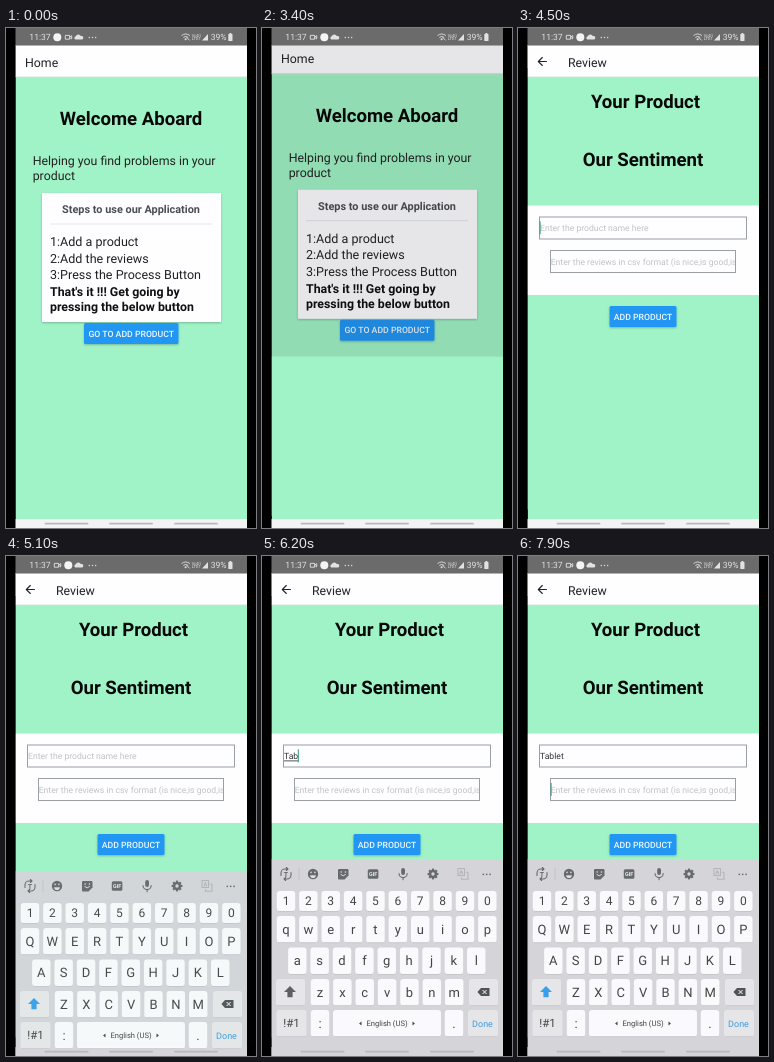
Write an HTML page that moves like this. It is 250 by 500 pixels and loops after 8000 ms.

```html
<!DOCTYPE html>
<html lang="en">
<head>
<meta charset="utf-8">
<title>Product review app</title>
<style>
  html, body { margin: 0; width: 100%; height: 100%; overflow: hidden; background: #000; }
  svg { display: block; width: 100%; height: 100%; }
  text { font-family: Roboto, sans-serif; fill: #222; white-space: pre; text-rendering: geometricPrecision; }
  .mid { text-anchor: middle; }
  .bold { font-weight: 700; fill: #111; }
  .title { font-size: 18.6px; font-weight: 700; text-anchor: middle; fill: #080808; }
  .body { font-size: 12.35px; }
  .input { font-size: 8.65px; fill: #333; }
  .hint { fill: #c2c2c5; }
  .line { fill: none; stroke: #66696d; stroke-width: 1.1; stroke-linecap: round; stroke-linejoin: round; }
</style>
</head>
<body>
<svg id="stage" viewBox="0 0 250 500"></svg>
<script>
const LOOP = 8000, STEP = 100;
const LEFT = 9.5, WIDTH = 231.5, TOP = 17, BOTTOM = 491, HEIGHT = BOTTOM - TOP;
const GREEN = '#a0f3c6', WHITE = '#fefdff', TRAY = '#d5d5d9', PALE = '#e6e6e9';

const rect = (x, y, w, h, fill, extra = '') =>
  `<rect x="${x}" y="${y}" width="${w}" height="${h}" fill="${fill}" ${extra}/>`;
const band = (y, h, fill, extra) => rect(LEFT, y, WIDTH, h, fill, extra);
const text = (x, y, str, cls = '', extra = '') =>
  `<text x="${x}" y="${y}" class="${cls}" ${extra}>${str}</text>`;
const path = (d, extra = 'class="line"') => `<path d="${d}" ${extra}/>`;
const circle = (x, y, r, fill) => `<circle cx="${x}" cy="${y}" r="${r}" fill="${fill}"/>`;

const header = (x, label) =>
  band(TOP, 32, WHITE) + band(48.5, 1, '#d3e2da') + text(x, 38.7, label, 'body');

const button = (x, y, w, label) =>
  rect(x, y, w, 21, '#2196f3', 'rx="1.5" filter="url(#shadow)"') +
  text(x + w / 2, y + 13.6, label, 'mid', 'style="fill:#eef7ff;font-size:8.7px;font-weight:500"');

function homeScreen() {
  const steps = ['1:Add a product', '2:Add the reviews', '3:Press the Process Button'];
  return band(TOP, HEIGHT, GREEN) + header(19, 'Home') +
    text(125, 97, 'Welcome Aboard', 'title') +
    text(26.7, 137.3, 'Helping you find problems in your', 'body') +
    text(26.7, 151.8, 'product', 'body') +
    rect(36, 165, 179, 129, WHITE, 'filter="url(#shadow)"') +
    text(125, 185, 'Steps to use our Application', 'mid bold', 'style="fill:#4a4e53;font-size:10.9px"') +
    rect(44, 195.5, 162, 1, '#e1e8ee') +
    steps.map((s, i) => text(44, 218 + i * 16.7, s, 'body', 'style="font-size:12.55px"')).join('') +
    text(44, 268.2, "That's it !!! Get going by", 'body bold') +
    text(44, 282.8, 'pressing the below button', 'body bold') +
    button(78, 295, 94.5, 'GO TO ADD PRODUCT');
}

const inputBox = (x, y, w) =>
  rect(x, y, w, 22, WHITE, 'stroke="#9a9fa4" stroke-width="1"');

function reviewScreen() {
  return band(TOP, HEIGHT, GREEN) + header(50, 'Review') +
    path('M28.5 33.5H20.5M24.3 29.5l-4 4 4 4', 'class="line" style="stroke:#222"') +
    text(127.5, 80, 'Your Product', 'title') +
    text(125, 138.3, 'Our Sentiment', 'title') +
    band(177.5, 89.5, WHITE) +
    inputBox(21.5, 189, 207) + inputBox(32.5, 222.5, 185) +
    text(22, 203, 'Enter the product name here', 'input hint', 'id="hint"') +
    text(22, 203, '', 'input', 'id="typed"') +
    rect(22, 204.5, 0, .8, '#333', 'id="underline"') +
    `<g clip-path="url(#reviews)">` +
    text(32.7, 236.7, 'Enter the reviews in csv format (is nice,is good,is bad)', 'input hint') + '</g>' +
    rect(0, 0, 1, 13, '#2f9a7c', 'id="caret"') +
    button(91.5, 278, 67, 'ADD PRODUCT');
}

function statusBar() {
  const ink = '#e2e2e2';
  const label = (x, y, str, size) => text(x, y, str, '', `style="fill:${ink};font-size:${size}px"`);
  const stroke = `fill="none" stroke="${ink}" stroke-width=".9"`;
  return band(0, 17.5, '#6b6b6b') +
    label(23.3, 12.4, '11:37', 8.6) +
    `<g id="badge">${circle(0, 0, 4, '#f4f4f4')}</g>` +
    `<g id="camera">${path('M-3-1.9h4.3v3.8H-3zM1.5-.4 3.4-1.6v3.2L1.5.4', stroke)}</g>` +
    path('M69.3 11.5a1.7 1.7 0 0 1 .5-3.2 2.7 2.7 0 0 1 5-.2 1.8 1.8 0 0 1 1.4 3.4z', `fill="${ink}"`) +
    [83.3, 86.5, 89.7].map(x => circle(x, 9.5, .7, ink)).join('') +
    path('M175.5 7.6q4.2-3.2 8.4 0M177.3 9.4q2.4-2 4.8 0M180.5 9l3 3.4', stroke) +
    circle(179.6, 11.3, 1, ink) +
    label(185.8, 8.5, 'VoD)', 4.2) + label(185.8, 12.4, 'LTE1', 4.2) +
    path('M196 12.5h6V6z', `fill="${ink}"`) +
    label(204.7, 12.4, '39%', 8.6) +
    rect(222.3, 6, 4.2, 7, ink, 'rx=".6"') + rect(223.4, 5, 2, 1.2, ink);
}

const cap = (cx, y, w, h, fill) =>
  rect(cx - w / 2, y, w, h, fill, 'rx="3"') + rect(cx - w / 2 + 1.5, y + h, w - 3, .6, '#bcbcc1');

const key = (cx, y, w, h, label, { cls = '', size = 13, fill = '#faf9fb' } = {}) =>
  cap(cx, y, w, h, fill) +
  text(cx, y + h / 2 + size * .35, label, 'mid ' + cls, `style="fill:#444;font-size:${size}px"`);

function toolbar() {
  const dark = '#66696d';
  const gear = Array.from({ length: 8 }, (_, i) =>
    rect(169.9, 312.6, 2.2, 3, dark, `transform="rotate(${i * 45} 171 318)"`)).join('');
  return path('M19 319.5v-2.5a4 4 0 0 1 4-4h2.5M29 316.5v2.5a4 4 0 0 1-4 4h-2.5M24.3 311.5l1.7 1.5-1.7 1.5M23.7 321.5l-1.7 1.5 1.7 1.5') +
    text(24, 320.6, 'T', 'mid', `style="fill:${dark};font-size:7px;font-weight:700"`) +
    rect(36.7, 312, .7, 12, '#bcbcc0') +
    circle(51, 318, 5.2, dark) + circle(49.1, 316.4, .8, '#ddd') + circle(52.9, 316.4, .8, '#ddd') +
    path('M48.2 319.2h5.6a2.8 2.8 0 0 1-5.6 0z', 'fill="#ddd"') +
    path('M77 312.9h8.5a1 1 0 0 1 1 1v5.5l-4 4H77a1 1 0 0 1-1-1v-8.5a1 1 0 0 1 1-1z', `fill="${dark}"`) +
    path('M78.6 318.4q2.6 2.8 5.2 0', 'fill="none" stroke="#ddd" stroke-width="1"') +
    circle(79.2, 316, .8, '#ddd') + circle(83.4, 316, .8, '#ddd') +
    rect(105.8, 313.3, 10.6, 9.4, dark, 'rx="1.5"') +
    text(111.1, 320, 'GIF', 'mid', 'style="fill:#eee;font-size:5.4px;font-weight:700"') +
    rect(139.2, 312, 3.8, 7, dark, 'rx="1.9"') + path('M137 317.5a4.1 4.1 0 0 0 8.2 0M141.1 321.8v2') +
    gear + circle(171, 318, 4.1, dark) + circle(171, 318, 1.7, TRAY) +
    '<g opacity=".3">' + path('M196 312.5h6.5v7H196zM199.5 321.5v1.8h6.5v-7h-1.8M198 318l1.3-3.5 1.3 3.5') + '</g>' +
    [221.3, 224.7, 228.1].map(x => circle(x, 318.3, .85, dark)).join('');
}

function keyboard() {
  const row = (chars, x, y, h, style) =>
    [...chars].map((c, i) => key(x + i * 22.37, y, 18.4, h, c, style)).join('');
  const letter = { cls: 'letter' };
  return band(303, 200, TRAY) + toolbar() +
    row('1234567890', 24, 335, 20, { size: 12 }) +
    row('QWERTYUIOP', 24, 360, 26.5, letter) +
    row('ASDFGHJKL', 35.3, 391.5, 26.5, letter) +
    row('ZXCVBNM', 58, 423, 26.5, letter) +
    cap(28.5, 423, 29, 26.5, PALE) +
    path('M28 430l6 6h-3.4v5.2h-5.2V436H22z', 'id="shift" stroke-linejoin="round"') +
    cap(221.5, 423, 29, 26.5, PALE) +
    path('M219 432h8.5v8H219l-3.6-4z', 'fill="#505458"') +
    path('M220.6 434l4 4m0-4-4 4', 'stroke="#fff" stroke-width="1"') +
    key(29.5, 454, 30, 26.5, '!#1', { size: 11.5, fill: PALE }) +
    key(58, 454, 18.4, 26.5, ':') +
    key(125, 454, 108, 26.5, 'English (US)', { size: 7.6 }) +
    path('M99.5 465.5v4l-2.4-2zM150.5 465.5v4l2.4-2z', 'fill="#444"') +
    key(192, 454, 18.4, 26.5, '.') +
    cap(221, 454, 30, 26.5, PALE) +
    text(220.5, 470.5, 'Done', 'mid', 'style="fill:#3f9be0;font-size:9px"');
}

const stage = document.getElementById('stage');
stage.innerHTML = `<defs>
    <filter id="shadow" x="-10%" y="-20%" width="120%" height="150%">
      <feDropShadow dx="0" dy="1" stdDeviation=".9" flood-opacity=".25"/></filter>
    <clipPath id="screen">${band(TOP, HEIGHT, '#000')}</clipPath>
    <clipPath id="phone">${band(0, 500, '#000')}</clipPath>
    <clipPath id="reveal"><rect id="edge" x="${LEFT}" width="${WIDTH}" height="500"/></clipPath>
    <clipPath id="reviews">${rect(32.5, 223, 184.5, 21, '#000')}</clipPath>
  </defs>` +
  rect(0, 0, 250, 500, '#000') +
  `<g clip-path="url(#screen)">
    <g id="home">${homeScreen()}${band(TOP, HEIGHT, '#000', 'id="dim"')}</g>
    <g clip-path="url(#reveal)"><g id="review">${reviewScreen()}</g></g>
  </g>` + statusBar() + band(BOTTOM, 500 - BOTTOM, '#f3f3f3') +
  `<g clip-path="url(#phone)"><g id="keyboard">${keyboard()}</g></g>` +
  [38.5, 103, 168].map(x => rect(x, 494.8, 44, 1.6, '#b9b9b9', 'rx=".8"')).join('');

const el = id => document.getElementById(id);
const set = (id, attrs) => Object.entries(attrs).forEach(([k, v]) => el(id).setAttribute(k, v));
const letters = [...stage.querySelectorAll('.letter')];
const clamp = v => Math.min(1, Math.max(0, v));

// cubic-bezier(.35, .45, 0, 1), solved by bisection
function revealEase(x) {
  const curve = (a, b, s) => 3 * (1 - s) ** 2 * s * a + 3 * (1 - s) * s * s * b + s ** 3;
  let lo = 0, hi = 1;
  for (let i = 0; i < 24; i++) {
    const mid = (lo + hi) / 2;
    if (curve(.35, 0, mid) < x) lo = mid; else hi = mid;
  }
  return curve(.45, 1, lo);
}

const TYPING = [[0, ''], [5600, 'T'], [6000, 'Ta'], [6200, 'Tab'], [6400, 'Tabl'], [6600, 'Table'], [6800, 'Tablet']];
const CARET = [[0, ''], [4500, 'first'], [5000, ''], [5600, 'first'], [7400, ''], [7500, 'second']];
const CAPS = [[0, true], [5700, false], [7600, true]];
const at = (table, t) => table.filter(([start]) => start <= t).pop()[1];

function draw(t) {
  const swap = clamp((t - 200) / 300);
  set('badge', { transform: `translate(${51.3 + 11 * swap} 9.3)` });
  set('camera', { transform: `translate(${62.3 - 11 * swap} 9.3)` });

  const p = t < 3400 ? 0 : revealEase(clamp((t - 3331) / 425));
  set('home', { transform: `translate(0 ${-.02 * HEIGHT * p})` });
  set('dim', { opacity: .1 * clamp(p / .36) });
  set('edge', { y: TOP + HEIGHT * (1 - p) });
  set('review', { transform: `translate(0 ${.041 * HEIGHT * (1 - p)})` });

  const shown = clamp((t - 4700) / 500);
  set('keyboard', { opacity: shown * (2 - shown), transform: `translate(0 ${60 * (1 - shown)})` });

  const typed = at(TYPING, t), caps = at(CAPS, t), caret = at(CARET, t);
  el('typed').textContent = typed;
  const width = typed ? el('typed').getComputedTextLength() : 0;
  set('hint', { opacity: typed ? 0 : 1 });
  set('underline', { width: t < 7400 ? width : 0 });
  set('caret', {
    x: caret === 'second' ? 32.6 : 21.6 + width,
    y: caret === 'second' ? 227 : 193.3,
    opacity: caret ? 1 : 0
  });
  letters.forEach(n => {
    n.textContent = caps ? n.textContent.toUpperCase() : n.textContent.toLowerCase();
  });
  set('shift', { fill: caps ? '#3a9fea' : '#5c6064' });
}

const start = performance.now();
let last = -1;
function frame() {
  const t = Math.floor(((performance.now() - start) % LOOP) / STEP) * STEP;
  if (t !== last) draw(last = t);
  requestAnimationFrame(frame);
}
frame();
</script>
</body>
</html>
```
